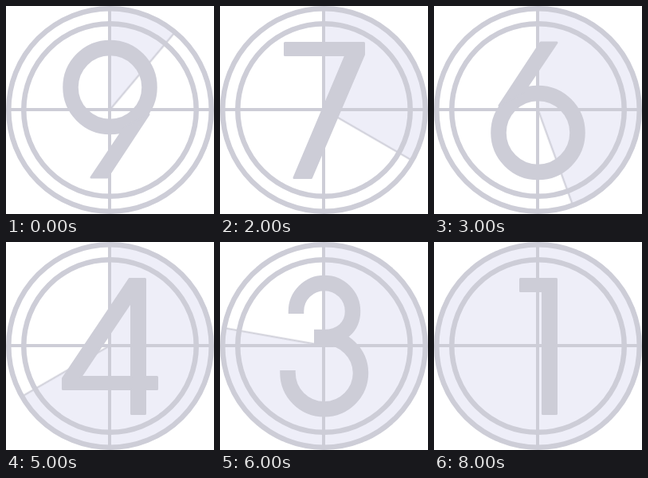
An HTML page that plays this animation: 261 by 261 pixels, repeating every 9 s.

```html
<!DOCTYPE html>
<html lang="en">
<head>
<meta charset="utf-8">
<title>Film countdown</title>
<style>
  html, body { margin: 0; width: 100%; height: 100%; overflow: hidden; background: #fff; }
  svg { display: block; width: 100%; height: 100%; }
  .line { fill: none; stroke: #cdcdd7; }

  .sweep {
    fill: none; stroke: #eeeef8; stroke-width: 126; stroke-dasharray: 9 9;
    animation: sweep 9s steps(9, jump-start) infinite;
  }
  .needle {
    stroke-width: 2; transform-origin: 130.5px 130px;
    animation: turn 9s steps(9, jump-start) infinite;
  }
  /* each digit is visible for one ninth of the loop */
  .digit {
    visibility: hidden;
    animation: show 9s step-end infinite;
    animation-delay: calc((var(--i) - 9) * 1s);
  }
  .pen { fill: none; stroke: #cdcdd7; stroke-width: 19.5; }
  .solid { fill: #cdcdd7; stroke: #cdcdd7; stroke-width: 3; stroke-linejoin: round; }

  @keyframes sweep { from { stroke-dashoffset: 9; } to { stroke-dashoffset: 0; } }
  @keyframes turn { to { transform: rotate(360deg); } }
  @keyframes show {
    0% { visibility: visible; }
    11.1111%, 100% { visibility: hidden; }
  }
</style>
</head>
<body>
<svg viewBox="0 0 261 261">
  <defs>
    <g id="nine">
      <circle class="pen" cx="130.5" cy="102" r="49.5"/>
      <path class="solid" d="M107 215H127L179 136L150 151Z"/>
    </g>
  </defs>

  <circle class="sweep" cx="130.5" cy="130.5" r="63" pathLength="9" transform="rotate(-90 130.5 130.5)"/>
  <path class="line needle" d="M130.5 130V5"/>
  <path class="line" stroke-width="4" d="M130 2V259M2 130H259"/>
  <g class="line" stroke-width="6.5">
    <circle cx="130.5" cy="130.5" r="127.25"/>
    <circle cx="130.5" cy="130.5" r="108.25"/>
  </g>

  <use class="digit" style="--i:0" href="#nine"/>
  <g class="digit" style="--i:1">
    <ellipse class="pen" cx="130.5" cy="86" rx="35.5" ry="34.5"/>
    <circle class="pen" cx="130.5" cy="164" r="45.5"/>
  </g>
  <path class="digit solid" style="--i:2" d="M81.5 46.5H180.5V61L114.5 215.5H93L158 61.5H81.5Z"/>
  <use class="digit" style="--i:3" href="#nine" transform="rotate(180 130.5 130.5)"/>
  <path class="digit pen" style="--i:4" stroke-linejoin="bevel" d="M174 54.5H101L95 131A47.5 47.5 0 1 1 84 167"/>
  <path class="digit solid" style="--i:5" fill-rule="evenodd" d="M155 46.5H174.5V169.5H189.5V184.5H174.5V215.5H157.5V184.5H71.5V171ZM157.5 74V169.5H93.5Z"/>
  <path class="digit pen" style="--i:6" d="M95.5 90V87A35.5 35.5 0 0 1 166.5 87C166.5 107 151 119.5 131 119.5H118M131 119.5A45.5 45.5 0 0 1 176.5 164A45.75 45.75 0 0 1 85 164V161"/>
  <path class="digit pen" style="--i:7" d="M87 98V94A43 43 0 0 1 173 94Q173 112 158 130L98 207.5H180"/>
  <path class="digit solid" style="--i:8" d="M108.5 46.5H153.5V215.5H136.5V61.5H108.5Z"/>
</svg>
</body>
</html>
```
